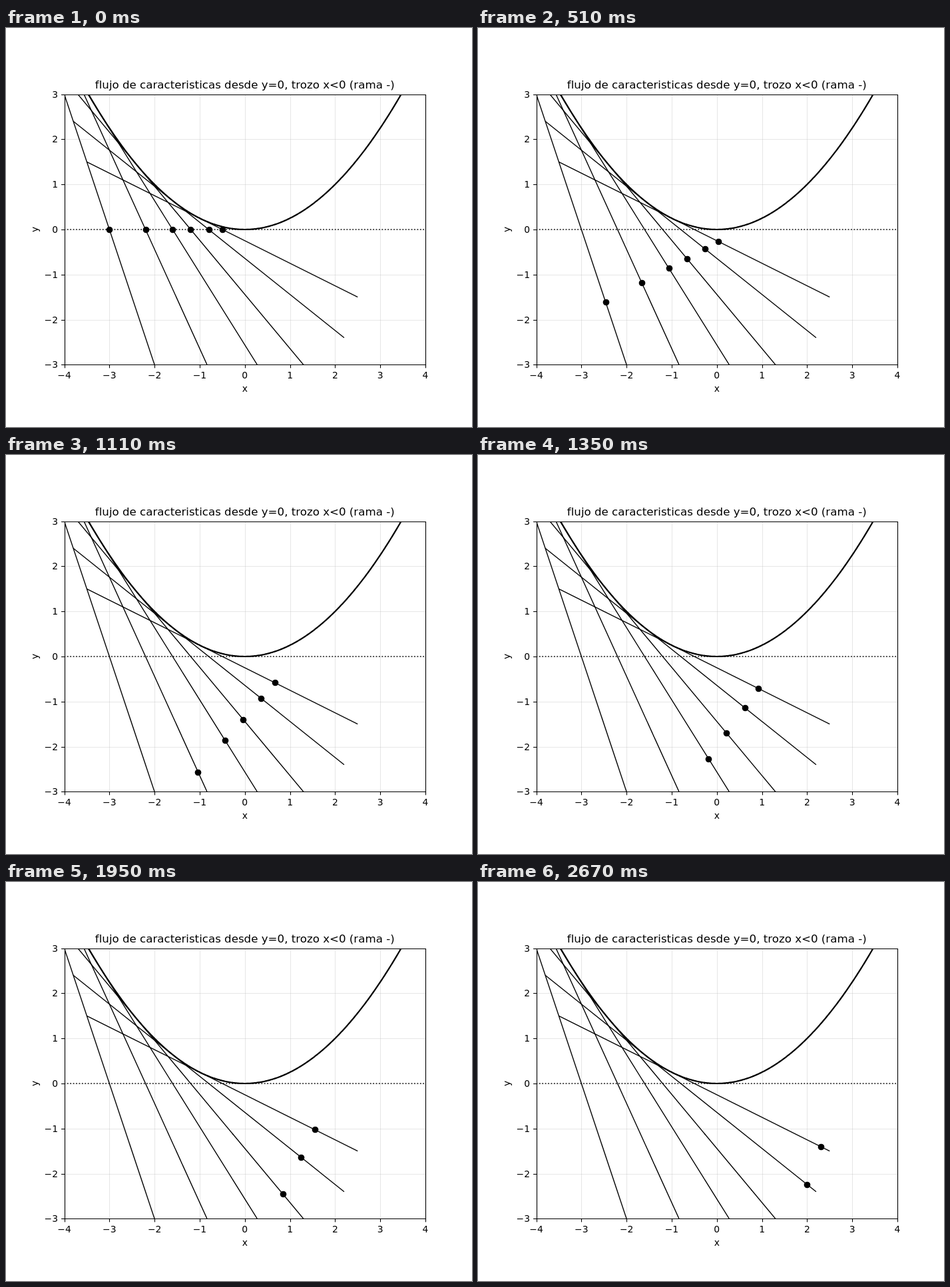
Write an HTML page that moves like this. It is 700x600 px and loops after 2700 ms.

```html
<!DOCTYPE html>
<html lang="es">
<head>
<meta charset="utf-8">
<style>
  html, body { margin: 0; width: 100%; height: 100%; overflow: hidden; background: #fff; }
  svg { display: block; width: 100vw; height: 100vh; }
  text { font: 13.889px "DejaVu Sans", sans-serif; text-anchor: middle; }
  .title { font-size: 16.667px; }
  .ytick { text-anchor: end; }
  path { fill: none; stroke: #000; stroke-width: 1.389; }
  .grid { stroke: #b0b0b0; stroke-opacity: .3; stroke-width: 1.111; }
  .frame { stroke-width: 1.111; }
  .curve { stroke-width: 2.222; stroke-linejoin: round; }
  .axis { stroke-width: 1.667; stroke-dasharray: 1.667 2.75; }
</style>
</head>
<body>
<svg viewBox="0 0 700 600">
  <clipPath id="plot"><rect x="88" y="100" width="542" height="406"/></clipPath>
  <g id="content" clip-path="url(#plot)"></g>
  <g id="axes"></g>
  <text class="title" x="358.75" y="91">flujo de caracteristicas desde y=0, trozo x&lt;0 (rama -)</text>
  <text x="358.75" y="547">x</text>
  <text transform="translate(48 303) rotate(-90)">y</text>
</svg>
<script>
const UNIT = 67.8125, STEP_MS = 30, STEPS = 90, REACH = 2.8;
const starts = [-3, -2.2, -1.6, -1.2, -0.8, -0.5];

const px = x => 358.75 + x * UNIT;
const py = y => 303 - y * UNIT;
const snap = v => Math.floor(v + 0.5) + 0.5;
const path = (d, cls = '') => `<path class="${cls}" d="${d}"/>`;
const label = n => (n < 0 ? '\u2212' : '') + Math.abs(n);
const range = n => Array.from({ length: 2 * n + 1 }, (_, i) => i - n);

let grid = '', axes = '';
for (const n of range(4)) {
  const x = snap(px(n));
  grid += path(`M${x} 100V506`, 'grid');
  axes += path(`M${x} 506V511.4`, 'frame') + `<text x="${px(n)}" y="527">${label(n)}</text>`;
}
for (const n of range(3)) {
  const y = snap(py(n));
  grid += path(`M88 ${y}H630`, 'grid');
  axes += path(`M88 ${y}H83.1`, 'frame') +
    `<text class="ytick" x="78" y="${Math.round(py(n)) + 5}">${label(n)}</text>`;
}
axes += path('M88.5 100.5H630.5V506.5H88.5Z', 'frame');

const parabola = 'M' + range(200).map(i => `${px(i / 50)} ${py((i / 50) ** 2 / 4)}`).join('L');
// Each characteristic leaves (s, 0) with slope s.
const rays = starts.map(s =>
  path(`M${px(s - 3)} ${py(-3 * s)}L${px(s + 3)} ${py(3 * s)}`)).join('');

const content = document.getElementById('content');
content.innerHTML = grid + path(parabola, 'curve') + path('M87.5 303H630', 'axis') +
  rays + '<circle r="4.86"/>'.repeat(starts.length);
document.getElementById('axes').innerHTML = axes;

const dots = content.querySelectorAll('circle');

function draw() {
  const step = Math.floor(performance.now() / STEP_MS) % STEPS;
  const d = REACH * step / (STEPS - 1);
  starts.forEach((s, i) => {
    dots[i].setAttribute('cx', snap(px(s + d)));
    dots[i].setAttribute('cy', snap(py(s * d)));
  });
  requestAnimationFrame(draw);
}
draw();
</script>
</body>
</html>
```
